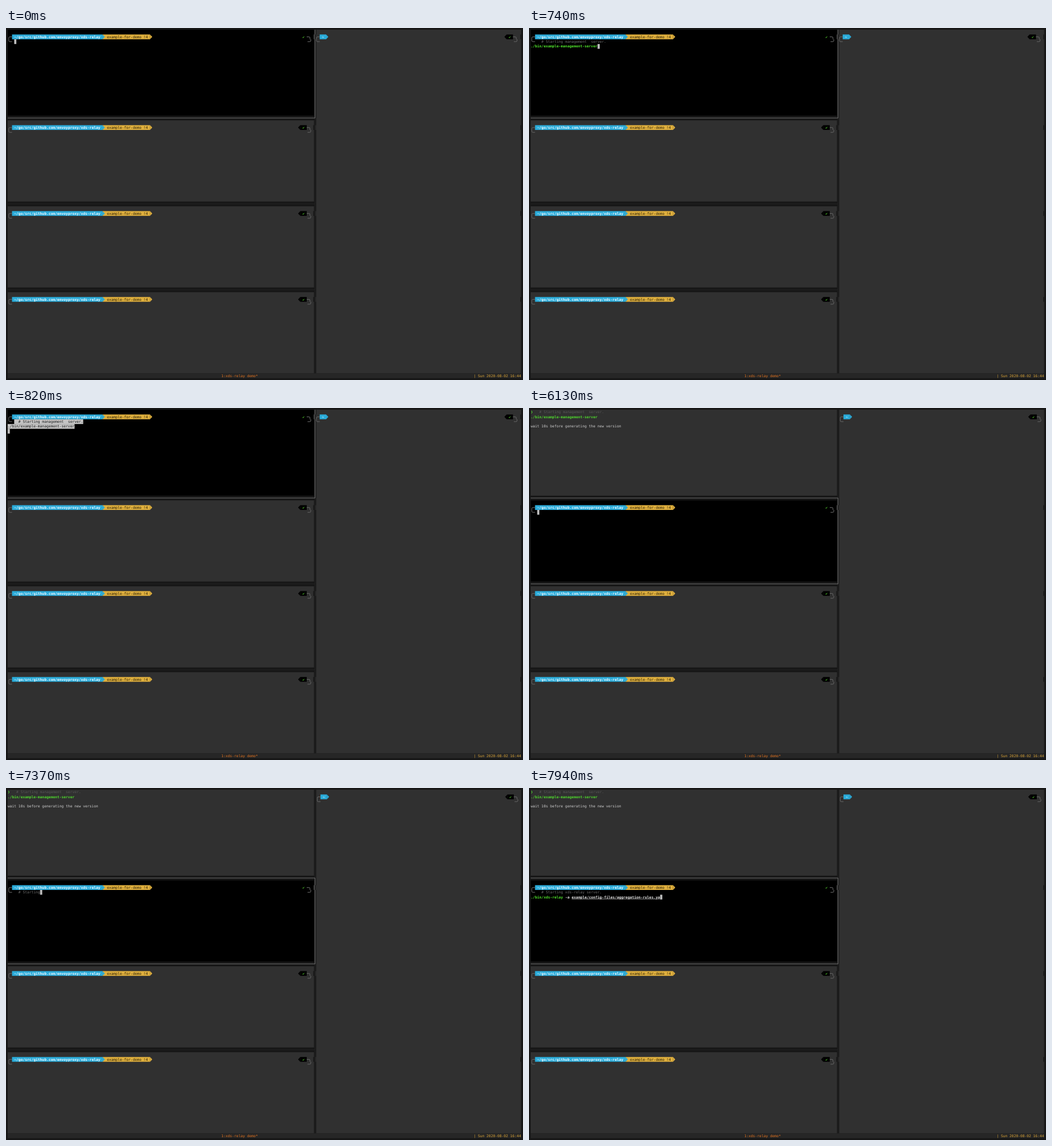
Recreate the animation shown at these times as an HTML page. Size 906 by 618 pixels, loop 8000 ms.

```html
<!DOCTYPE html>
<html>
<head>
<meta charset="utf-8">
<style>
  html, body { margin: 0; width: 100%; height: 100%; overflow: hidden; background: #171717; }
  svg { display: block; }
  text {
    font: 6.279px "DejaVu Sans Mono", monospace;
    white-space: pre;
    text-rendering: geometricPrecision;
  }
  .bold { font-weight: bold; }
  .path { text-decoration: underline; }
</style>
</head>
<body>
<svg id="screen" width="906" height="618" viewBox="0 0 906 618"></svg>
<script>
const LOOP = 8000;
const CELL_W = 3.78, CELL_H = 8.38, ORIGIN = 3;
const SPLIT_COL = 142, RIGHT_COL = 143, LAST_COL = 238;
const CHECK_SHIFT = -1.4; // the check mark is narrower than its cell
const BLUE = '#2aabd9', YELLOW = '#dfaf3d', GREEN = '#50e32c', WHITE = '#e4e4e4';
const GAP = '#171717', IDLE = '#303030', GRAY = '#6c6c6c', CURSOR = '#bdbdbd';

// Left panes, top to bottom: first row and number of rows
const PANES = [[0, 18], [19, 17], [37, 17], [55, 17]];

const SERVER = { row: 2, comment: '  # Starting management  server.',
  command: './bin/example-management-server', args: '', file: '' };
const RELAY = { row: 21, comment: '  # Starting xds-relay server.',
  command: './bin/xds-relay', args: ' -a ', file: 'example/config-files/aggregation-rules.ya' };

// [time, typed characters]
const SERVER_KEYS = [[0, 0], [500, 19], [580, 34], [660, 49], [740, 64]];
const RELAY_KEYS = [[0, 0], [7370, 12], [7450, 31], [7620, 43], [7700, 55], [7780, 67], [7860, 79], [7940, 91]];
const SWITCHES = [820, 1870, 6130];

const screen = document.getElementById('screen');
const x = col => ORIGIN + col * CELL_W;
const y = row => ORIGIN + row * CELL_H;

const box = (left, top, width, height, fill) =>
  `<rect x="${left}" y="${top}" width="${width}" height="${height}" fill="${fill}"/>`;
const cells = (col, row, w, h, fill) => box(x(col), y(row), w * CELL_W, h * CELL_H, fill);
const text = (col, row, string, fill, style = '') =>
  `<text x="${x(col)}" y="${y(row) + 6.3}" fill="${fill}" class="${style}">${string}</text>`;
const cursor = (col, row) => cells(col, row, 1, 1, CURSOR);
const shifted = (dx, content) => `<g transform="translate(${dx} 0)">${content}</g>`;

// Powerline arrow that fills one cell; dir 1 points right, -1 left
function arrow(col, row, fill, dir = 1) {
  const base = x(dir > 0 ? col : col + 1), tip = base + dir * CELL_W;
  return `<path d="M${base} ${y(row)}L${tip} ${y(row + .5)}L${base} ${y(row + 1)}z" fill="${fill}"/>`;
}

// Half of a rounded bracket: corner cell at col, opening towards dir, v = 1 for the top half
function corner(col, row, dir, v, stroke) {
  const cx = x(col + .5), cy = y(row + .5), r = 1.8;
  return `<path d="M${cx} ${cy + v * CELL_H / 2}V${cy + v * r}Q${cx} ${cy} ${cx + dir * r} ${cy}` +
    `H${cx + dir * CELL_W * 1.5}" fill="none" stroke="${stroke}" stroke-width=".8"/>`;
}

function prompt(left, right, row, path, branch, active) {
  const line = active ? '#929292' : '#777';
  const pathEnd = left + path.length + 4;
  let start = corner(left, row, 1, 1, line) +
    cells(left + 2, row, path.length + 2, 1, BLUE);
  if (branch) {
    start += cells(pathEnd, row, branch.length + 3, 1, YELLOW) +
      arrow(pathEnd + branch.length + 3, row, YELLOW) +
      text(pathEnd + 2, row, branch, '#241c08');
  }
  start += arrow(pathEnd, row, BLUE) + text(left + 3, row, path, '#f4fbff', 'bold');
  const end = cells(right - 4, row, 3, 1, '#000') + arrow(right - 5, row, '#000', -1) +
    corner(right, row, -1, 1, line);
  return start + shifted(CHECK_SHIFT, end + text(right - 3, row, '✔', '#4fc62b')) +
    corner(left, row + 1, 1, -1, line) + corner(right, row + 1, -1, -1, line);
}

const shellPrompt = (row, active) =>
  prompt(0, 140, row, '~/go/src/github.com/envoyproxy/xds-relay', 'example-for-demo !4', active);

function typing({ row, comment, command, args, file }, count) {
  const note = comment.slice(0, count);
  const typed = count - comment.length - 1;
  let out = text(3, row, note, GRAY);
  if (typed < 0) return out + cursor(3 + note.length, row);
  const done = typed >= command.length;
  const argCol = command.length, fileCol = argCol + args.length;
  out += text(0, row + 1, command.slice(0, typed), done ? GREEN : WHITE, done ? 'bold' : 'path');
  if (typed > argCol) out += text(argCol, row + 1, args.slice(0, typed - argCol), WHITE, 'bold');
  if (typed > fileCol) out += text(fileCol, row + 1, file.slice(0, typed - fileCol), WHITE, 'bold path');
  return out + cursor(typed, row + 1);
}

function pastedBlock({ row, comment, command }) {
  const ink = '#161616', paper = '#c4c4c4';
  return cells(3, row, comment.length, 1, paper) + text(3, row, comment, ink) +
    cells(0, row + 1, command.length, 1, paper) + text(0, row + 1, command, ink) +
    cursor(0, row + 2);
}

function runningServer(active) {
  return text(0, 0, '❯', GREEN) +
    text(2, 0, SERVER.comment, active ? GRAY : '#585858') +
    text(0, 1, SERVER.command, active ? GREEN : '#4fd62e', 'bold') +
    text(0, 3, 'wait 10s before generating the new version', active ? WHITE : '#cfcfcf', active ? 'bold' : '') +
    (active ? cursor(0, 4) : '');
}

function borders(activePane, shiftedRows) {
  const middle = x(SPLIT_COL + .5);
  const [first, rows] = PANES[activePane];
  const lit = '#858585', dim = '#252525';
  let out = box(middle - .4, y(0), .8, 72 * CELL_H, dim);
  PANES.slice(1).forEach(([row], i) => {
    const touches = i === activePane || i + 1 === activePane;
    out += box(x(0), y(row - .5) - .4, middle - x(0), .8, touches ? lit : dim);
  });
  const top = first ? first - .5 : 0;
  out += box(middle - .4, y(top), .8, (first + rows + .5 - top) * CELL_H, lit);
  for (const row of shiftedRows) {
    const color = row >= top && row < first + rows ? lit : dim;
    out += shifted(CHECK_SHIFT, cells(SPLIT_COL, row, 1, 1, GAP) +
      box(middle - .4, y(row), .8, CELL_H, color)) +
      box(x(SPLIT_COL + 1) + CHECK_SHIFT, y(row), -CHECK_SHIFT, CELL_H, IDLE) +
      box(x(LAST_COL) + CHECK_SHIFT, y(row), -CHECK_SHIFT, CELL_H, GAP);
  }
  return out;
}

const latest = (keys, t) => keys.filter(([time]) => time <= t).pop()[1];

function draw(t) {
  const [pasted, started, switched] = SWITCHES.map(time => t >= time);
  const activePane = switched ? 1 : 0;
  const promptRows = started ? [20, 38, 56] : [1, 20, 38, 56];

  let out = cells(RIGHT_COL, 0, LAST_COL - RIGHT_COL, 72, IDLE);
  PANES.forEach(([row, rows], i) => {
    out += cells(0, row, SPLIT_COL, rows, i === activePane ? '#000' : IDLE);
  });
  out += borders(activePane, promptRows);
  for (const row of promptRows) out += shellPrompt(row, row === (switched ? 20 : 1));
  out += shifted(started ? 0 : CHECK_SHIFT, prompt(RIGHT_COL, 236, 1, '~', '', false));

  if (started) out += runningServer(!switched);
  else if (pasted) out += pastedBlock(SERVER);
  else out += typing(SERVER, latest(SERVER_KEYS, t));
  if (switched) out += typing(RELAY, latest(RELAY_KEYS, t));

  return out + cells(0, 72, LAST_COL, 1, '#262626') +
    text(99, 72, '1:xds-relay demo*', '#e2731f') +
    text(216, 72, '| Sun 2020-08-02 16:44', '#d9a336');
}

let shown = '';
function tick() {
  const picture = draw(performance.now() % LOOP);
  if (picture !== shown) screen.innerHTML = shown = picture;
  requestAnimationFrame(tick);
}
tick();
</script>
</body>
</html>
```
